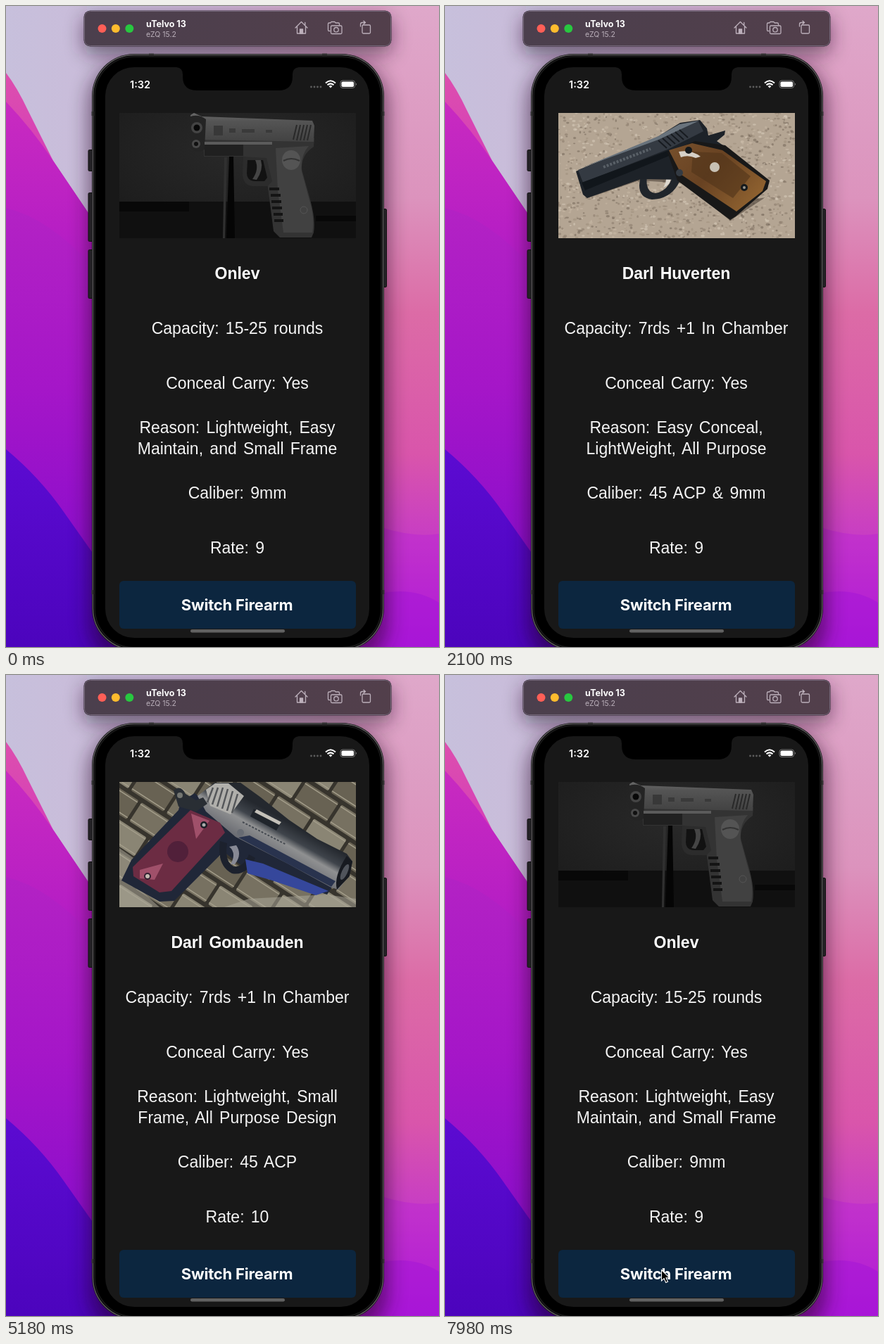
Animation, 615 px wide and 911 px high, one loop 8 s. Source, as an HTML page:

```html
<!DOCTYPE html>
<html lang="en">
<head>
<meta charset="utf-8">
<title>Simulator</title>
<style>
html, body { margin: 0; width: 100%; height: 100%; overflow: hidden; background: #111; }
svg { display: block; width: 615px; height: 911px; }
.ui { font-family: Inter, sans-serif; }
.body { font: 23px "Liberation Sans", Arial, sans-serif; word-spacing: 2.9px; fill: #f4f4f4; text-anchor: middle; }
.body .title { font-weight: 700; fill: #fff; }
</style>
</head>
<body>
<svg viewBox="0 0 615 911" xmlns="http://www.w3.org/2000/svg">
<defs>
  <linearGradient id="sky" x1="0" y1="0" x2="1" y2="0">
    <stop offset="0" stop-color="#c7c0dc"/><stop offset=".45" stop-color="#cdb6d6"/><stop offset="1" stop-color="#e0a6c8"/>
  </linearGradient>
  <linearGradient id="right" x1="0" y1="0" x2="0" y2="1">
    <stop offset="0" stop-color="#dfa8ca"/><stop offset=".3" stop-color="#dc93bd"/><stop offset=".48" stop-color="#dc6ba6"/>
    <stop offset=".7" stop-color="#d955ab"/><stop offset=".84" stop-color="#c63bc6"/><stop offset="1" stop-color="#ac16d6"/>
  </linearGradient>
  <linearGradient id="ridge" x1="0" y1="0" x2="0" y2="1">
    <stop offset="0" stop-color="#dd4fae"/><stop offset=".5" stop-color="#d035bd"/><stop offset="1" stop-color="#bd22c8"/>
  </linearGradient>
  <linearGradient id="hill" x1="0" y1="0" x2="0" y2="1">
    <stop offset="0" stop-color="#c92bc0"/><stop offset=".35" stop-color="#b81fc4"/><stop offset="1" stop-color="#8f10cc"/>
  </linearGradient>
  <linearGradient id="hill2" x1="0" y1="0" x2="0" y2="1">
    <stop offset="0" stop-color="#b322c4"/><stop offset=".5" stop-color="#a516c8"/><stop offset="1" stop-color="#8a0dcc"/>
  </linearGradient>
  <linearGradient id="blue" x1="0" y1="0" x2="0" y2="1">
    <stop offset="0" stop-color="#5c0bd2"/><stop offset="1" stop-color="#4c04bd"/>
  </linearGradient>
  <linearGradient id="bar" x1="0" y1="0" x2="1" y2="0">
    <stop offset="0" stop-color="#4b3f4d"/><stop offset="1" stop-color="#523f4b"/>
  </linearGradient>
  <radialGradient id="studio" cx=".5" cy=".3" r=".75">
    <stop offset="0" stop-color="#292929"/><stop offset="1" stop-color="#1b1b1b"/>
  </radialGradient>
  <linearGradient id="steel" x1="0" y1="0" x2="0" y2="1">
    <stop offset="0" stop-color="#686868"/><stop offset=".3" stop-color="#545454"/><stop offset="1" stop-color="#424242"/>
  </linearGradient>
  <linearGradient id="wood" x1="0" y1="0" x2="1" y2=".6">
    <stop offset="0" stop-color="#77502c"/><stop offset=".5" stop-color="#684222"/><stop offset="1" stop-color="#8d602f"/>
  </linearGradient>
  <linearGradient id="slide" gradientUnits="userSpaceOnUse" x1="385" y1="200" x2="359" y2="246">
    <stop offset="0" stop-color="#24282e"/><stop offset=".35" stop-color="#3f444b"/><stop offset=".55" stop-color="#8f9091"/><stop offset="1" stop-color="#6c6e74"/>
  </linearGradient>
  <filter id="blur" x="-20%" y="-100%" width="140%" height="300%"><feGaussianBlur stdDeviation="14"/></filter>
  <clipPath id="photo"><rect x="161" y="152" width="336" height="178"/></clipPath>
</defs>

<!-- wallpaper -->
<rect width="615" height="911" fill="url(#sky)"/>
<path d="M330 0H615V911H330Z" fill="url(#right)"/>
<rect x="115" width="425" height="70" fill="url(#sky)"/>
<path d="M0 95Q16 116 31 148L67 220L125 306V500H0Z" fill="url(#ridge)"/>
<path d="M0 136Q38 176 67 220L125 306V640H0Z" fill="url(#hill)"/>
<path d="M0 287Q60 301 125 372V800H0Z" fill="url(#hill2)"/>
<path d="M0 630Q48 670 82 719L125 780L340 911H0Z" fill="url(#blue)"/>
<path d="M530 740Q580 756 615 750V911H530Z" fill="#b51fd6" opacity=".35"/>
<path d="M530 835Q580 825 615 848V911H530Z" fill="#a012d8" opacity=".45"/>
<rect x="118" y="78" width="424" height="860" rx="60" fill="#200020" opacity=".55" filter="url(#blur)"/>
<rect x="111" y="16" width="436" height="52" rx="9" fill="#281028" opacity=".55" filter="url(#blur)"/>

<!-- toolbar -->
<rect x="110.5" y="6.5" width="437" height="51" rx="9" fill="#2c232d"/>
<rect x="111.5" y="7.5" width="435" height="49" rx="8" fill="url(#bar)" stroke="#75687a"/>
<circle cx="136.500" cy="32" r="6" fill="#ff5f57"/>
<circle cx="155.800" cy="32" r="6" fill="#febc2e"/>
<circle cx="175.300" cy="32" r="6" fill="#28c840"/>
<g class="ui">
  <text x="199" y="30" font-size="12.5" font-weight="700" fill="#fff">uTelvo 13</text>
  <text x="199" y="43.500" font-size="10.500" fill="#b9aeb9">eZQ 15.2</text>
</g>
<g fill="none" stroke="#bcb0bb" stroke-width="1.300" stroke-linejoin="round" stroke-linecap="round">
  <path d="M411 31L419.500 22.500L428 31M413.500 29.500V39H425.500V29.500M424.800 23.500V27"/>
  <path d="M417.500 39V33H421.500V39Z" fill="#bcb0bb"/>
  <path d="M460 35.500H458.500Q457.500 35.500 457.500 34V25.500Q457.500 24 459 24H461L462 22.500H467L468 24H472Q473.500 24 473.500 25.500V27"/>
  <rect x="461.500" y="28" width="15.500" height="11.500" rx="1.500"/><circle cx="469" cy="33.700" r="3.200"/>
  <rect x="506" y="27" width="11.500" height="12" rx="1.500"/>
  <path d="M503.500 29V26Q503.500 23.500 506 23.500H510M508 21.200L510.500 23.500L508 25.800"/>
</g>

<!-- phone -->
<g fill="#242226" stroke="#111" stroke-width="1">
  <rect x="117" y="204.500" width="7" height="30" rx="1.500"/>
  <rect x="117" y="265.500" width="7" height="69" rx="1.500"/>
  <rect x="117" y="346.500" width="7" height="69" rx="1.500"/>
  <rect x="535" y="288.500" width="5.500" height="111" rx="1.500"/>
</g>
<rect x="122" y="68" width="415" height="848" rx="60" fill="#19191a"/>
<rect x="123.500" y="69.500" width="412" height="845" rx="58.500" fill="#000" stroke="#5d5b5d" stroke-width="1.400"/>
<rect x="126" y="72" width="407" height="840" rx="56" fill="none" stroke="#171717" stroke-width="2"/>
<path d="M203 69H210M449 69H456M123 150V156M536 150V156M123 830V836M536 830V836" stroke="#303030" stroke-width="3"/>
<rect x="141" y="87" width="375" height="811" rx="41" fill="#181818"/>
<path d="M242 87Q251 88 251 97V100Q251 120 271 120H387Q407 120 407 100V97Q407 88 416 87V85H242Z" fill="#000"/>
<text class="ui" x="176" y="116.500" font-size="14.500" font-weight="600" fill="#fff">1:32</text>
<g fill="#5c5c5c"><circle cx="433.500" cy="115" r="1.400"/><circle cx="438" cy="115" r="1.400"/><circle cx="442.500" cy="115" r="1.400"/><circle cx="447" cy="115" r="1.400"/></g>
<g fill="none" stroke="#fff" stroke-width="2.100">
  <path d="M454 109.500Q461 103 468 109.500M456.500 112.300Q461 108.300 465.500 112.300"/>
  <path d="M461 116.300L458.900 114Q461 112.300 463.100 114Z" fill="#fff" stroke-width=".5"/>
</g>
<rect x="475" y="106" width="20.500" height="10.500" rx="3" fill="none" stroke="#777"/>
<rect x="476.500" y="107.500" width="17.500" height="7.500" rx="1.800" fill="#fff"/>
<path d="M497 109.500Q499 111.200 497 113Z" fill="#888"/>

<!-- photos -->
<g clip-path="url(#photo)">
  <g class="pic">
    <rect x="161" y="152" width="336" height="178" fill="url(#studio)"/>
    <path d="M161 278H497V330H161Z" fill="#101010"/>
    <path d="M161 278H260V292H161ZM440 298H497V306H440Z" fill="#080808"/>
    <path d="M317 212H323L325 330H313Z" fill="#050505"/>
    <path d="M310 215H314L311 330H308Z" fill="#303030"/>
    <path d="M280 188H438L437 200Q419 212 420 232L432 275Q440 304 437 322L434 329H389L380 320L372 258L366 222L338 214H281Z" fill="#333"/>
    <path d="M383 202L430 199Q418 212 420 235L431 276Q439 302 435 322L394 322L386 262Z" fill="#414141"/>
    <path d="M337 214L336 238Q336 254 350 256H372L378 249L370 216Z" fill="#2c2c2c"/>
    <path d="M343 219L342 238Q343 249 354 249H367L371 244L365 219Z" fill="#121212"/>
    <path d="M354 219Q360 232 350 246L356 247Q366 232 362 219Z" fill="#454545"/>
    <path d="M262 155L267 152L278 157L435 163L438 170L437 193L280 190L262 181Z" fill="url(#steel)"/>
    <path d="M262 157Q274 153 284 161L282 204Q271 210 262 202Z" fill="#242424"/>
    <path d="M282 194H337V213H282Z" fill="#202020"/>
    <path d="M282 193H378V197H282Z" fill="#5b5b5b"/>
    <circle cx="271" cy="173" r="8" fill="#444"/><circle cx="271" cy="173" r="4.500" fill="#080808"/>
    <circle cx="270" cy="196" r="6" fill="#484848"/><circle cx="270" cy="196" r="3" fill="#101010"/>
    <rect x="295" y="170" width="13" height="14" fill="#383838"/>
    <path d="M317 174H326V180H317ZM335 175H353V180H335ZM369 176H378V180H369Z" fill="#3a3a3a"/>
    <path d="M413 169L408 190M418 169L413 191M423 169L418 191M428 169L423 191M433 169L428 191" stroke="#292929" stroke-width="2"/>
    <ellipse cx="405" cy="219" rx="13" ry="14" fill="#545454"/><path d="M394 220Q405 214 417 220" fill="none" stroke="#333" stroke-width="2"/>
    <path d="M374 260H388M376 269H390M377 278H391M378 287H392M380 296H393M381 305H394" stroke="#141414" stroke-width="4"/>
    <circle cx="423" cy="290" r="5" fill="none" stroke="#555"/>
  </g>
  <g class="pic">
    <rect x="161" y="152" width="336" height="178" fill="#b4a593"/>
    <g id="carpet"></g>
    <path d="M200 274L276 248L340 252L405 305L455 272L398 282L330 225Z" fill="#554b40" opacity=".65"/>
    <path d="M278 242Q270 272 294 275Q324 274 335 245L326 234Q319 263 299 266Q284 265 287 242Z" fill="#20252b"/>
    <path d="M308 234Q319 244 310 258Q324 253 321 235Z" fill="#ddd8cf"/>
    <path d="M186 235L300 187L334 166L362 162L372 174L374 184L398 177L397 183L386 192L398 200L360 206L342 247L278 246L202 273L196 268Z" fill="#1d2228"/>
    <path d="M189 233L303 186L333 169L360 164L367 178L318 203L196 251Z" fill="#343a42"/>
    <path d="M194 230L303 185L333 168L361 163L303 190Z" fill="#69737c"/>
    <path d="M194 251L318 205L323 211L199 262Z" fill="#11161b"/>
    <path d="M225 229L292 203" stroke="#596067" stroke-width="4" stroke-dasharray="3 2"/>
    <path d="M303 191L315 202M309 188L321 199M315 185L327 196M321 182L333 193M327 179L339 190M333 176L345 187" stroke="#171b20" stroke-width="2"/>
    <path d="M316 208L330 248L405 304L413 299L458 260L461 248L398 198L355 192Z" fill="#181818"/>
    <path d="M318 205L351 195L394 205L456 249L451 263L414 292L336 240Z" fill="url(#wood)"/>
    <path d="M352 207L393 209L434 242L409 273L350 236Z" fill="#513519" opacity=".6"/>
    <path d="M332 207Q350 204 363 214L356 216Q345 211 335 215Z" fill="#d6d0c7"/>
    <circle cx="383" cy="229" r="7" fill="#c8c1b4"/>
    <circle cx="346" cy="205" r="5" fill="#15191c"/><circle cx="425" cy="258" r="5" fill="#15191c"/><circle cx="425" cy="258" r="2" fill="#98958c"/>
    <circle cx="333" cy="237" r="5" fill="#343b43"/>
  </g>
  <g class="pic">
    <rect x="161" y="152" width="336" height="178" fill="#37342d"/>
    <g id="straps"></g>
    <path d="M161 246L184 262L174 290L218 330H161Z" fill="#a9a698" opacity=".55"/>
    <path d="M345 318L455 312L497 318V330H310Z" fill="#a9a698" opacity=".55"/>
    <!-- frame, guard and trigger -->
    <path d="M248 180L268 168L292 188L314 214L326 228L464 300L456 312L391 290L341 276L309 251L239 321L218 322L164 292L178 263L245 192Z" fill="#202738"/>
    <path d="M304 236Q299 271 321 282Q342 286 354 260L345 255Q337 274 323 272Q310 265 314 239Z" fill="#1c212d"/>
    <path d="M317 244Q328 253 319 269L325 269Q336 255 327 242Z" fill="#878995"/>
    <path d="M340 262L365 268L458 307L440 313L375 291L343 282Z" fill="#35479b"/>
    <!-- slide -->
    <path d="M272 172L296 153H333L362 174L402 206L442 233L484 254L492 265L488 284L472 305L462 302L400 268L326 230L284 194Z" fill="url(#slide)"/>
    <path d="M330 231L462 301L468 293L346 228Z" fill="#29334e"/>
    <path d="M284 163L297 154H316L338 172L319 198L290 186Z" fill="#b0afab"/>
    <path d="M294 160L286 181M301 160L293 184M308 160L300 187M315 162L307 190M322 165L314 193M329 169L321 196" stroke="#55575a" stroke-width="2.500"/>
    <path d="M352 190L390 211L384 221L347 201Z" fill="#20252b"/><path d="M356 191L391 209L388 213L353 195Z" fill="#c4c1b9"/>
    <path d="M336 209L398 241" stroke="#454a51" stroke-width="2" stroke-dasharray="3 2"/>
    <path d="M470 305Q465 286 484 257L492 265L488 286Z" fill="#171a20"/><ellipse cx="481" cy="280" rx="4" ry="12" transform="rotate(25 481 280)" fill="#50545b"/>
    <path d="M238 164Q248 155 255 169L270 178L280 174L286 183L270 194L245 187Z" fill="#292e34"/><circle cx="247" cy="171" r="4" fill="#747671"/>
    <!-- grip -->
    <path d="M262 192L304 210L311 224L235 307L218 309L181 286L180 273Z" fill="#6c2c43"/>
    <path d="M263 197L289 207L270 233ZM190 277L223 268L211 291L190 289Z" fill="#a0506a"/>
    <circle cx="244" cy="251" r="15" fill="#51203a"/>
    <circle cx="281" cy="213" r="5" fill="#191d25"/><circle cx="281" cy="213" r="2.500" fill="#aaa"/>
    <circle cx="201" cy="286" r="5" fill="#302030"/><circle cx="201" cy="286" r="3" fill="#c6bcb3"/>
    <circle cx="333" cy="224" r="5" fill="#676b73"/>
  </g>
</g>

<g class="body" id="info"></g>

<!-- button -->
<rect id="btn" x="161" y="817" width="336" height="68" rx="6"/>
<text id="label" class="ui" x="328" y="859" font-size="22" font-weight="700" letter-spacing="-.2" text-anchor="middle">Switch Firearm</text>
<rect x="262" y="886" width="134" height="4.500" rx="2.250" fill="#616161"/>
<path id="cursor" d="M0 0V15.500L3.600 12.200L6.200 18L9 16.800L6.500 11.200H11.300Z" fill="#000" stroke="#fff" stroke-width="1.100"/>
</svg>
<script>
const LOOP = 8000;
const $ = id => document.getElementById(id);
const rows = [388, 466, 544, 607, 637, 700, 778];
const cards = [
  ["Onlev", "Capacity: 15-25 rounds", "Conceal Carry: Yes", "Reason: Lightweight, Easy",
   "Maintain, and Small Frame", "Caliber: 9mm", "Rate: 9"],
  ["Darl Huverten", "Capacity: 7rds +1 In Chamber", "Conceal Carry: Yes", "Reason: Easy Conceal,",
   "LightWeight, All Purpose", "Caliber: 45 ACP & 9mm", "Rate: 9"],
  ["Darl Gombauden", "Capacity: 7rds +1 In Chamber", "Conceal Carry: Yes", "Reason: Lightweight, Small",
   "Frame, All Purpose Design", "Caliber: 45 ACP", "Rate: 10"]
];
const switches = [[0, 0], [2100, 1], [3430, 2], [7910, 0]];
const presses = [[560, 630], [2030, 2100], [3360, 3430]];
const pointer = [ // from, to, x, y
  [420, 560, 318, 849.5], [3430, 3710, 307.5, 841.5], [4760, 5180, 307.5, 842],
  [6510, 7070, 308.5, 842.5], [7630, LOOP, 307.5, 845.5]
];

function make(tag, attrs, parent) {
  const el = document.createElementNS("http://www.w3.org/2000/svg", tag);
  for (const k in attrs) el.setAttribute(k, attrs[k]);
  return parent.appendChild(el);
}

let seed = 7;
const rand = () => (seed = seed * 16807 % 2147483647) / 2147483647;

const tones = ["#8f8070", "#d3c6b5", "#a29280", "#c4b6a3", "#7d6f61"];
for (let i = 0; i < 1500; i++) {
  make("ellipse", {
    cx: (161 + rand() * 336).toFixed(1), cy: (152 + rand() * 178).toFixed(1),
    rx: (1 + rand() * 1.8).toFixed(1), ry: (0.8 + rand() * 1.2).toFixed(1),
    fill: tones[i % tones.length], opacity: 0.65
  }, $("carpet"));
}

// Woven straps running diagonally under the third photo
const weave = make("g", { transform: "rotate(33 329 241)" }, $("straps"));
const cloth = ["#777161", "#8a8574", "#686253"];
for (let r = 0; r < 9; r++) {
  for (let c = 0; c < 8; c++) {
    const x = 100 + c * 60 + r % 2 * 22, y = 75 + r * 38;
    make("rect", { x, y, width: 55, height: 32, rx: 2, fill: cloth[(r + c) % 3] }, weave);
    make("path", { d: `M${x} ${y + 3}h55M${x} ${y + 29}h55`, stroke: "#a39d8a", "stroke-width": 1.5 }, weave);
  }
}

const lines = rows.map((y, i) => make("text", { x: 328.5, y, class: i ? "" : "title" }, $("info")));
const pics = document.querySelectorAll(".pic");
const within = t => ([a, b]) => t >= a && t < b;
let shown = -1;

function showCard(n) {
  if (n === shown) return;
  shown = n;
  lines.forEach((el, i) => { el.textContent = cards[n][i]; });
  pics.forEach((el, i) => { el.style.display = i === n ? "" : "none"; });
}

function draw(t) {
  showCard(switches.filter(s => t >= s[0]).pop()[1]);
  const down = presses.some(within(t));
  $("btn").setAttribute("fill", down ? "#142233" : "#0c263f");
  $("label").setAttribute("fill", down ? "#c6c8ca" : "#fff");
  const p = pointer.find(within(t));
  $("cursor").style.display = p ? "" : "none";
  if (p) $("cursor").setAttribute("transform", `translate(${p[2]} ${p[3]})`);
}

const start = performance.now();
function tick() {
  draw((performance.now() - start) % LOOP);
  requestAnimationFrame(tick);
}
tick();
</script>
</body>
</html>
```
